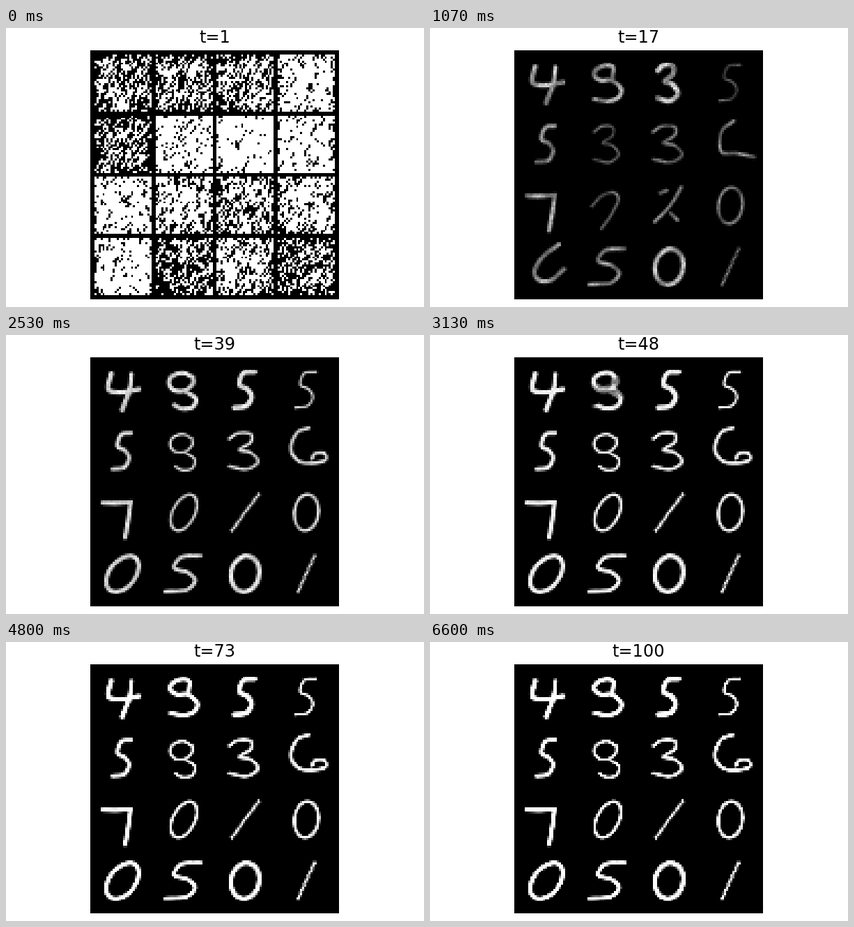
These frames come from a looping animation (600 px wide and 400 px high, 7.67 s). A matplotlib script:

```python
import matplotlib.pyplot as plt
import numpy as np
from matplotlib.animation import FuncAnimation

LOOP_MS, TICK_MS, STEP_MS, STEPS = 7670, 26, 200 / 3, 100
LEFT, TOP, SIDE = 121, 32, 357        # image box on the 600 x 400 stage
CELL, PAD, GRID = 28, 2, 122          # 4 x 4 tiles with black padding
HEIGHT = 17.5                         # digit height in grid cells
KEY_TIMES = [17, 25, 39, 57]


def oval(lean):
    a = np.linspace(0, 2 * np.pi, 13)
    return [list(zip(0.5 + 0.5 * np.cos(a), 0.5 + 0.5 * np.sin(a - lean)))]


# pen strokes in a unit box, y downwards
GLYPHS = {
    "0": oval(0.45),
    "o": oval(0.1),
    "1": [[(1, 0), (0, 1)]],
    "2": [[(.2, .15), (.45, .08)], [(1, 0), (.6, .5), (0, .95)], [(.6, .72), (.85, .9)]],
    "3": [[(0, .15), (.3, 0), (.75, .02), (.75, .25), (.35, .45), (.75, .53), (1, .8),
           (.6, 1), (0, .92)]],
    "4": [[(.1, 0), (0, .35), (.1, .48), (.5, .5), (1, .42)], [(.75, .02), (.7, .4), (.45, 1)]],
    "5": [[(1, 0), (.45, .04), (.25, .35), (.65, .48), (.85, .7), (.6, .95), (0, 1)]],
    "6": [[(.5, 0), (.18, .12), (0, .45), (.04, .75), (.3, .95), (.7, .97), (1, .88),
           (.95, .7), (.7, .7), (.6, .85)]],
    "c": [[(.4, 0), (.05, .3), (.05, .85), (.5, .9), (1, 1)]],
    "u": [[(.75, 0), (.3, .3), (0, .75), (.15, 1), (.5, 1), (.9, .7)]],
    "7": [[(0, .02), (.5, .03), (1, 0)], [(.97, .03), (.9, .45), (.78, 1)]],
    "q": [[(0, .4), (.35, .1), (.8, 0), (1, .2), (.75, .6), (.35, 1)]],
    "8": [[(.68, .33), (.7, .06), (.4, 0), (.05, .12), (0, .3), (.25, .42), (.65, .42),
           (1, .65), (.9, .9), (.5, 1), (0, .95)]],
    "9": [[(.9, .12), (.5, 0), (.1, .1), (0, .3), (.2, .48), (.6, .48), (.9, .3), (.9, .12)],
          [(.6, .5), (1, .7), (.9, .95), (.5, 1), (.2, .9)]],
}

# glyph at each key time, digit width, pen width, share of black at the start
TILES = [
    ("4444", 15, 2.3, .52), ("8398", 13, 2.1, .50), ("3555", 10, 2.4, .46), ("5555", 10, 1.2, .18),
    ("5555", 9, 1.9, .60), ("3399", 12, 1.3, .14), ("3333", 14, 1.5, .08), ("cc66", 17, 1.7, .14),
    ("7777", 14, 2.1, .16), ("qq00", 13, 1.4, .30), ("2211", 13, 1.7, .42), ("oooo", 12, 1.5, .28),
    ("u000", 16, 2.1, .14), ("5955", 17, 1.9, .60), ("oooo", 14, 2.2, .34), ("1111", 8, 1.5, .58),
]

gy, gx = np.mgrid[:CELL, :CELL] + 0.5


def smooth(points, steps=14):
    """Catmull-Rom curve through the points."""
    p = np.array(points, float)
    p = np.vstack([2 * p[0] - p[1], p, 2 * p[-1] - p[-2]])
    u = np.linspace(0, 1, steps)[:, None]
    return np.vstack([b + 0.5 * u * (c - a + u * (2 * a - 5 * b + 4 * c - d
                                                  + u * (3 * (b - c) + d - a)))
                      for a, b, c, d in zip(p, p[1:], p[2:], p[3:])])


def draw(glyph, width, pen):
    """Rasterise a glyph with its centre of mass in the middle of the tile."""
    curves = [smooth(stroke) * (width, HEIGHT) for stroke in GLYPHS[glyph]]
    mass = np.concatenate([np.hypot(*np.gradient(c, axis=0).T) for c in curves])
    pts = np.vstack(curves)
    pts += CELL / 2 - np.average(pts, axis=0, weights=mass)
    dist = np.hypot(gx[..., None] - pts[:, 0], gy[..., None] - pts[:, 1]).min(-1)
    return np.clip(pen / 2 + 0.5 - dist, 0, 1)


def digit_tile(index, stages, pen, t, rng):
    """Blend between key shapes, filling in from dim and patchy to solid white."""
    place = np.interp(t, KEY_TIMES, range(len(KEY_TIMES)))
    k = min(int(place), len(KEY_TIMES) - 2)
    mix = np.clip((place - k - 0.3) / 0.4, 0, 1)
    ink = (1 - mix) * stages[k] + mix * stages[k + 1]

    sharp = np.interp(t, [25, 100], [1, 2.2])
    ink = np.clip((ink - 0.4) * sharp + 0.4, 0, 1) * (ink > 0)
    light = np.interp(t, [1, 17, 45], [0, min(0.4 * pen, 1), 1])
    patch = 0.5 + 0.5 * np.sin(0.5 * gx + 0.3 * gy + 2 * index)
    grain = rng.random(ink.shape)
    return (ink * light * (1 - np.interp(t, [17, 50], [0.4, 0]) * patch)
            * (1 - np.interp(t, [17, 60], [0.25, 0.03]) * grain))


def noise_tile(black, t, rng):
    """Clumpy noise, darker at the tile edges and around one spot, quickly fading."""
    field = rng.normal(size=(CELL, CELL))
    field += 0.45 * (np.roll(field, 1, 0) + np.roll(field, (-1, 1), (0, 1)))
    x, y = rng.uniform(10, 18, 2)
    field -= 1.5 * np.exp(-((gx - x) ** 2 + (gy - y) ** 2) / 8)
    field -= 0.9 * np.maximum(abs(gx / 14 - 1), abs(gy / 14 - 1)) ** 4
    white = (1 - black) * np.exp(-(t - 1) / 2.2)
    return (field > np.quantile(field, 1 - white)) * np.exp(-(t - 1) / 3) * (t < 12)


shapes = [[draw(g, width, pen) for g in glyphs] for glyphs, width, pen, _ in TILES]


def picture(t):
    rng = np.random.default_rng(t)
    img = np.zeros((GRID, GRID))
    for i, (_, _, pen, black) in enumerate(TILES):
        y, x = (PAD + n * (CELL + PAD) for n in divmod(i, 4))
        img[y:y + CELL, x:x + CELL] = np.maximum(digit_tile(i, shapes[i], pen, t, rng),
                                                 noise_tile(black, t, rng))
    return img


pictures = [picture(t) for t in range(1, STEPS + 1)]

fig = plt.figure(figsize=(6, 4), dpi=100, facecolor="white")
ax = fig.add_axes([LEFT / 600, 1 - (TOP + SIDE) / 400, SIDE / 600, SIDE / 400])
ax.axis("off")
image = ax.imshow(pictures[0], cmap="gray", vmin=0, vmax=1, interpolation="nearest")
title = ax.set_title("t=1", fontsize=17.28, pad=7.92, family="DejaVu Sans")


def update(frame):
    step = min(int((frame * TICK_MS + 28) / STEP_MS), STEPS - 1)
    image.set_data(pictures[step])
    title.set_text(f"t={step + 1}")
    return image, title


anim = FuncAnimation(fig, update, frames=LOOP_MS // TICK_MS, interval=TICK_MS,
                     repeat=True, repeat_delay=0)
plt.show()
```
